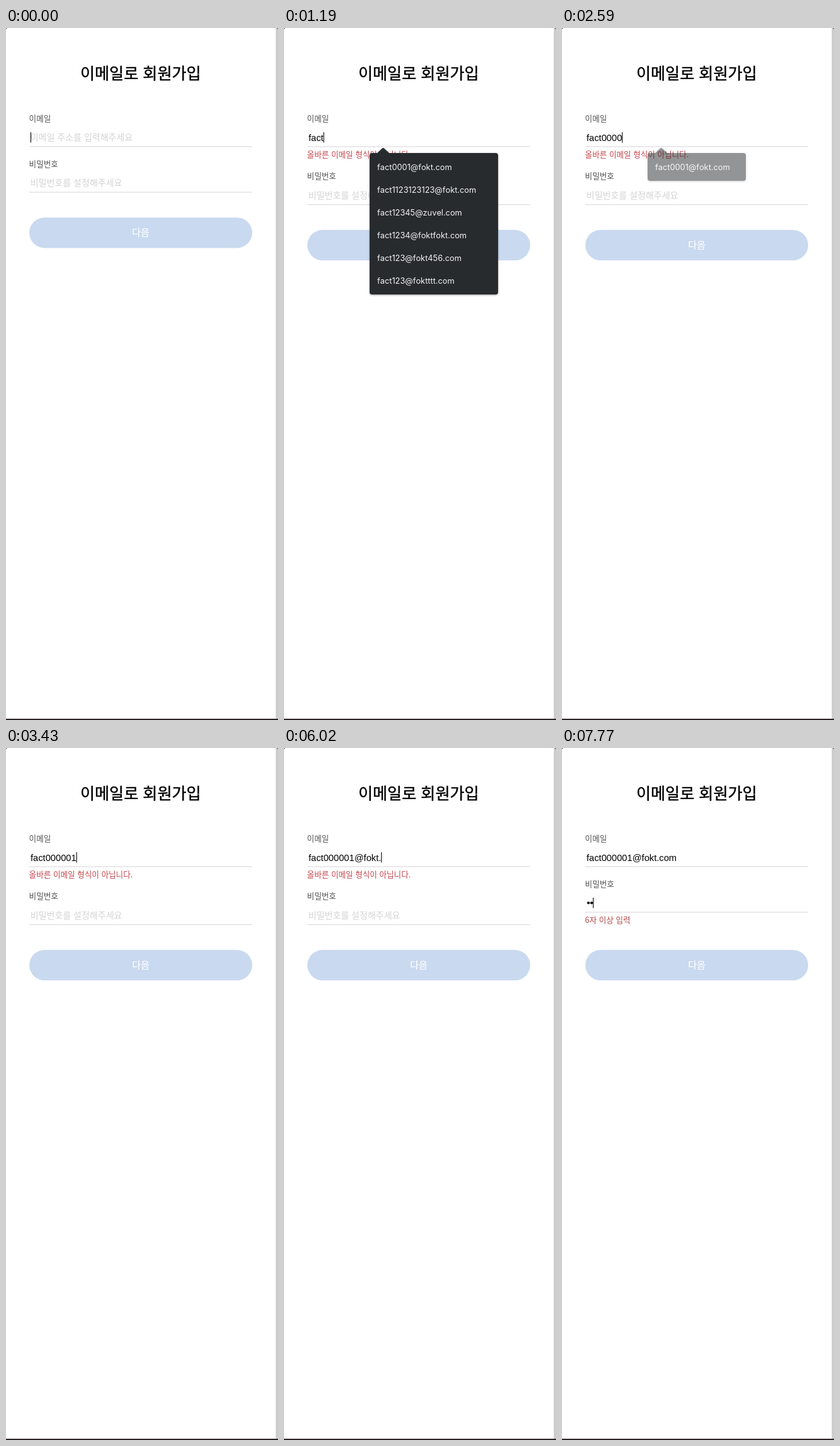
These frames come from a looping animation (432x1096 px, 8000 ms). An HTML page:

```html
<!DOCTYPE html>
<html lang="ko">
<head>
<meta charset="utf-8">
<title>이메일로 회원가입</title>
<style>
  html, body { margin: 0; width: 100%; height: 100%; overflow: hidden; background: #fff; }
  svg { display: block; width: 100vw; height: 100vh; }
  text { font-family: "Noto Sans CJK KR", "Noto Sans CJK", sans-serif; font-kerning: none; white-space: pre; }
  .title { font-size: 25.1px; fill: #000; stroke: #000; stroke-width: .45px; text-anchor: middle; }
  .label { font-size: 12.6px; fill: #505050; }
  .hint { font-size: 14px; fill: #d3d3d3; }
  .error { font-size: 12.6px; fill: #c5434a; }
  .error.dim { fill: #b04848; }
  .typed { font-family: "Liberation Sans", Arial, sans-serif; font-size: 14.7px; fill: #000; }
  .line { fill: #dcdcdc; }
  .next { font-size: 15px; fill: #fff; stroke: #fff; stroke-width: .2px; text-anchor: middle; }
  .item { font-family: Inter, Roboto, sans-serif; font-size: 12.8px; fill: #f4f4f4; }
  .panel { fill: #272b2e; }
</style>
</head>
<body>
<svg viewBox="0 0 432 1096" preserveAspectRatio="none">
  <rect width="432" height="1096" fill="#fff"/>
  <rect x="428.5" width="3.5" height="1096" fill="#cbcbcb"/>
  <rect y="1094" width="432" height="2" fill="#2a2429"/>
  <path d="M0 0H2L0 2ZM432 0H430L432 2Z" fill="#555"/>

  <text class="title" x="213.8" y="81.2">이메일로 회원가입</text>

  <text class="label" x="36.6" y="148.2">이메일</text>
  <text class="hint" id="mailHint" x="38.8" y="178.3">이메일 주소를 입력해주세요</text>
  <text class="typed" id="mail" x="39" y="178.6"></text>
  <rect class="line" x="37" y="187.3" width="354" height="1.2"/>
  <text class="error" id="mailError" x="36.6" y="205.2">올바른 이메일 형식이 아닙니다.</text>

  <g id="secret">
    <text class="label" x="36.6" y="219.8">비밀번호</text>
    <text class="hint" id="secretHint" x="38.8" y="250.2">비밀번호를 설정해주세요</text>
    <circle class="dot" cx="42" cy="245.3" r="2.1"/>
    <circle class="dot" cx="47" cy="245.3" r="2.1"/>
    <rect class="line" x="37" y="259.5" width="354" height="1.2"/>
  </g>
  <text class="error dim" id="secretError" x="36.6" y="277.2">6자 이상 입력</text>

  <g id="button">
    <rect x="37" y="300.2" width="354" height="48.2" rx="24.1" fill="#c9d9ef"/>
    <text class="next" x="214" y="329.4">다음</text>
  </g>

  <rect id="caret" width="1.1" height="16.5" fill="#000"/>

  <g id="popup">
    <path class="panel" d="M147 199L155.6 191Q157.5 189.2 159.4 191L168 199Z"/>
    <rect class="panel" id="panel" x="136" y="198" rx="4"/>
    <g id="items"></g>
  </g>
</svg>
<script>
const LOOP = 8000;
const SHIFT = 19.6;
const ADDRESS = 'fact000001@fokt.com';
const KEY_TIMES = [350, 630, 910, 1190, 1750, 2030, 2310, 2590, 2940, 3430,
  3850, 4760, 5040, 5530, 5810, 6020, 6230, 6370, 6650];
const DOT_TIMES = [7560, 7770];
const SUGGESTIONS = ['fact0001@fokt.com', 'fact1123123123@fokt.com', 'fact12345@zuvel.com',
  'fact1234@foktfokt.com', 'fact123@fokt456.com', 'fact123@foktttt.com'];

const $ = id => document.getElementById(id);
const within = (t, from, to) => t >= from && t < to;
const countPast = (times, t) => times.filter(k => t >= k).length;
const show = (el, on) => { el.style.visibility = on ? 'visible' : 'hidden'; };
const lower = (el, on) => el.setAttribute('transform', `translate(0 ${on ? SHIFT : 0})`);

const items = SUGGESTIONS.map((value, i) => {
  const el = document.createElementNS('http://www.w3.org/2000/svg', 'text');
  el.setAttribute('class', 'item');
  el.setAttribute('x', 148);
  el.setAttribute('y', 225 + 36 * i);
  el.textContent = value;
  $('items').append(el);
  return el;
});
const dots = [...document.querySelectorAll('.dot')];

function drawPopup(t) {
  const narrow = t >= 1750;
  const settled = within(t, 420, 1750) || t >= 1820;
  const popup = $('popup');
  show(popup, within(t, 350, 2660));
  popup.style.opacity = t >= 2590 ? .5 : 1;
  popup.style.filter = `drop-shadow(0 1px 1.5px rgba(0,0,0,${settled ? .4 : .3}))`;
  $('panel').setAttribute('width', narrow ? 156 : 204);
  $('panel').setAttribute('height', narrow ? 44 : 224);
  items.forEach((el, i) => { el.style.display = narrow && i > 0 ? 'none' : ''; });
}

function drawCaret(t, typed, dotCount) {
  const onSecret = t >= 7070;
  const offset = onSecret ? dotCount * 5.1 : typed ? $('mail').getComputedTextLength() : 0;
  $('caret').setAttribute('x', 38.9 + offset);
  $('caret').setAttribute('y', onSecret ? 237 : 165);
  show($('caret'), !within(t, 4410, 4760));
}

function render(t) {
  const typed = countPast(KEY_TIMES, t);
  const dotCount = countPast(DOT_TIMES, t);
  const badMail = within(t, 350, 6230);

  $('mail').textContent = ADDRESS.slice(0, typed);
  show($('mailHint'), !typed);
  show($('mailError'), badMail);
  show($('secretHint'), !dotCount);
  show($('secretError'), dotCount > 0);
  dots.forEach((dot, i) => show(dot, i < dotCount));
  lower($('secret'), badMail);
  lower($('button'), badMail || dotCount > 0);
  drawCaret(t, typed, dotCount);
  drawPopup(t);
}

const start = performance.now();
function tick(now) {
  render(Math.max(0, now - start) % LOOP);
  requestAnimationFrame(tick);
}
render(0);
requestAnimationFrame(tick);
</script>
</body>
</html>
```
